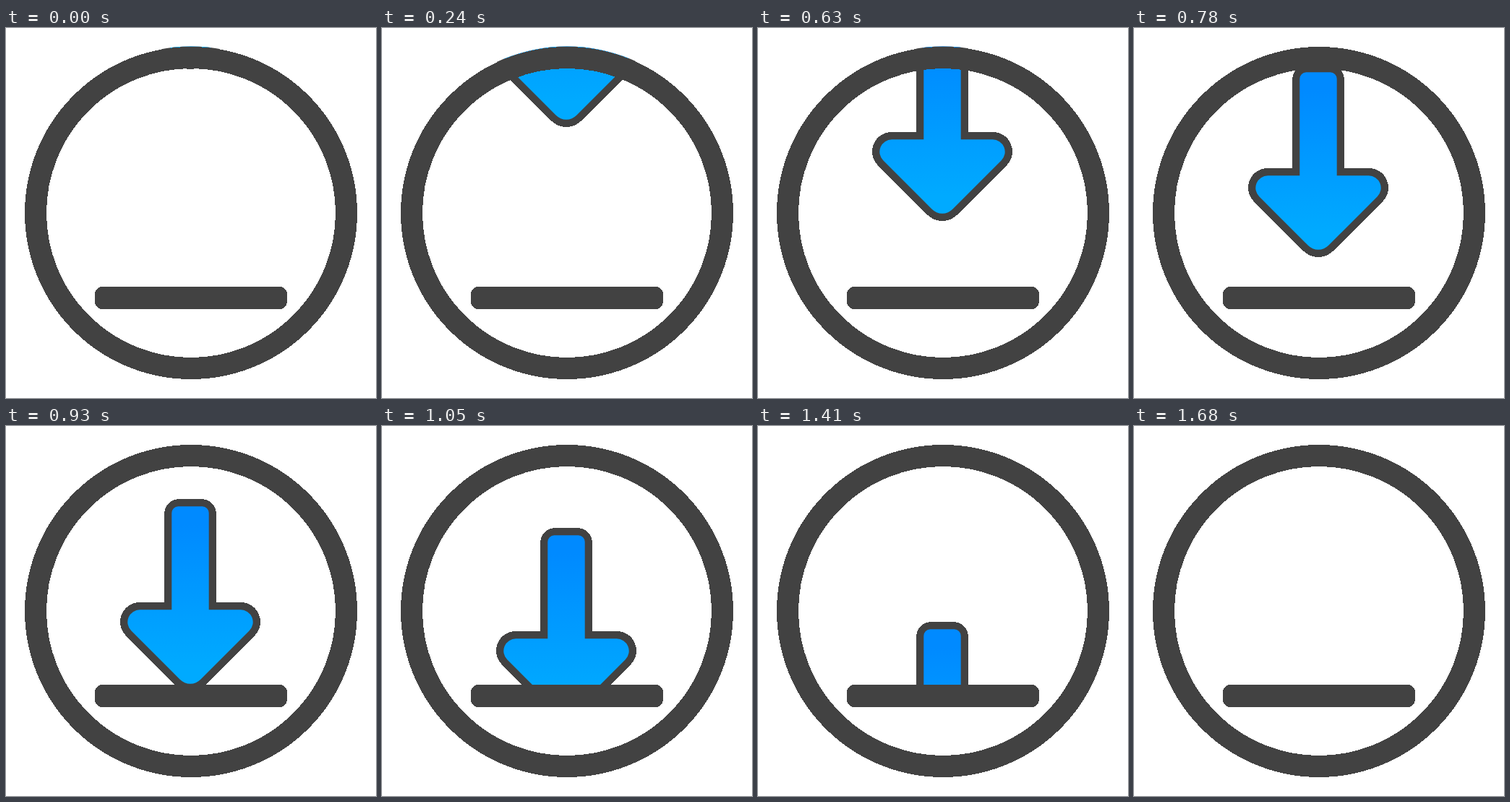
An HTML page for the animation above (1710 ms loop, 512x512 px).

```html
<!DOCTYPE html>
<html lang="en">
<head>
<meta charset="utf-8">
<title>Download arrow</title>
<style>
  html, body { margin: 0; height: 100%; overflow: hidden; background: #fff; }
  svg { display: block; width: 100vw; height: 100vh; }
  .dark { fill: #424242; shape-rendering: crispEdges; }
  .ring { fill: none; stroke: #424242; stroke-width: 30; shape-rendering: crispEdges; }
</style>
</head>
<body>
<svg viewBox="0 0 512 512">
  <defs>
    <linearGradient id="blue" x1="0" y1="0" x2="0" y2="1">
      <stop offset=".1" stop-color="#008aff"/>
      <stop offset=".9" stop-color="#00aaff"/>
    </linearGradient>
    <!-- Inside the ring and above the middle of the bar -->
    <clipPath id="window">
      <path d="M25.4 373V256a230.6 230.6 0 0 1 461.2 0V373z"/>
    </clipPath>
  </defs>
  <g clip-path="url(#window)">
    <g id="arrow">
      <path id="outline" class="dark"/>
      <path id="body" fill="url(#blue)"/>
    </g>
  </g>
  <circle class="ring" cx="256" cy="256" r="215"/>
  <rect class="dark" x="123" y="358" width="266" height="31" rx="10"/>
</svg>
<script>
  const STEP = 30, LOOP = 1710, SPEED = 10, START = -209;
  const SKIP_AT = 47; // one step is jumped over late in the fall
  const find = id => document.getElementById(id);

  // Arrow inset by d, with corner radii at the stem's top and the head's sides.
  // The tip's radius follows, so that its 45° edges touch both arcs.
  function arrowPath(d, top, side) {
    const left = 158 + d, right = 352 - d, stemL = 219 + d, stemR = 291 - d;
    const headY = 143 + d, tipY = 266 - d, k = Math.SQRT1_2;
    const tip = (side * Math.SQRT2 - 26 + d) / (Math.SQRT2 - 1);
    const sideX = side * (1 - k), sideY = headY + side * (1 + k);
    const tipEdge = tipY - tip * (1 - k);
    return `M${stemL + top} ${d}H${stemR - top}A${top} ${top} 0 0 1 ${stemR} ${d + top}` +
      `V${headY}H${right - side}A${side} ${side} 0 0 1 ${right - sideX} ${sideY}` +
      `L${255 + tip * k} ${tipEdge}A${tip} ${tip} 0 0 1 ${255 - tip * k} ${tipEdge}` +
      `L${left + sideX} ${sideY}A${side} ${side} 0 0 1 ${left + side} ${headY}` +
      `H${stemL}V${d + top}A${top} ${top} 0 0 1 ${stemL + top} ${d}z`;
  }

  find('outline').setAttribute('d', arrowPath(0, 21, 27));
  find('body').setAttribute('d', arrowPath(10.3, 9, 17));

  const arrow = find('arrow');
  const t0 = performance.now();

  function draw(now) {
    const step = Math.floor((Math.max(0, now - t0) % LOOP) / STEP);
    const y = START + SPEED * (step + (step >= SKIP_AT ? 1 : 0));
    arrow.setAttribute('transform', `translate(0 ${y})`);
    requestAnimationFrame(draw);
  }
  draw(t0);
</script>
</body>
</html>
```
